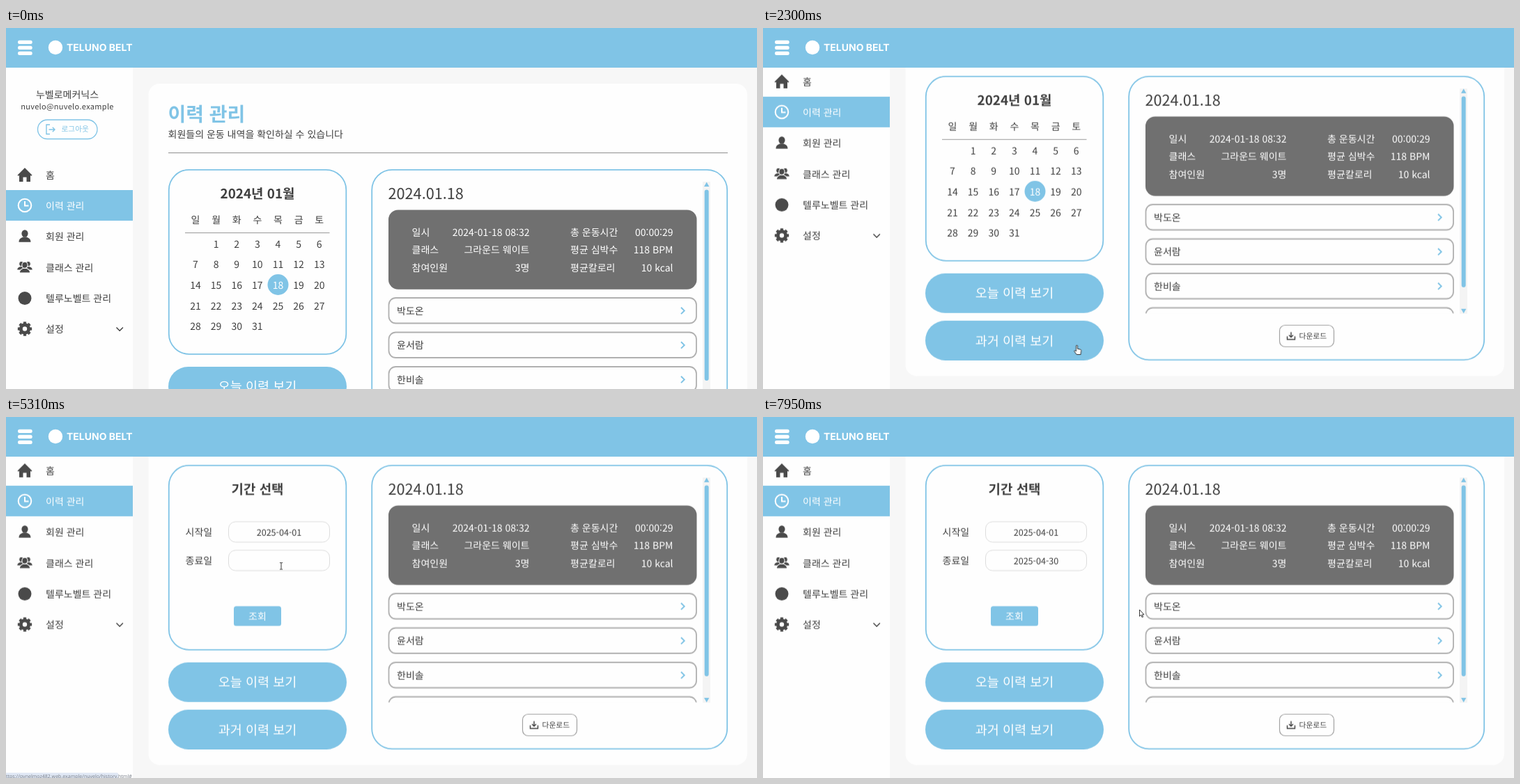
Recreate the animation shown at these times as an HTML page. Size 1078x519 px, loop 8000 ms.

```html
<!DOCTYPE html>
<html lang="ko">
<head>
<meta charset="utf-8">
<title>이력 관리</title>
<style>
  html, body { margin: 0; width: 100%; height: 100%; overflow: hidden; background: #f7f7f7; }
  svg { display: block; width: 100vw; height: 100vh; }
  svg {
    --blue: #80c4e6; --ink: #3f3f3f;
    font: 14px "Noto Sans CJK KR", "Noto Sans KR", "Noto Sans CJK", sans-serif;
    fill: var(--ink); text-rendering: geometricPrecision;
  }
  .blue { fill: var(--blue); }
  .white { fill: #fff; }
  .card { fill: #fefefe; stroke: var(--blue); stroke-width: 1.8; }
  .row { fill: #fefefe; stroke: #b0b0b0; stroke-width: 1.8; }
  .input { fill: #fefefe; stroke: #dcdcdc; }
  .line { fill: none; stroke: var(--ink); stroke-width: 1.4; }
  .mid { text-anchor: middle; }
  .end { text-anchor: end; }
  .medium { font-weight: 500; }
  .heading { font-size: 18.9px; font-weight: 700; }
  .button { font-size: 18.5px; font-weight: 500; fill: #fff; text-anchor: middle; }
  .value { font-size: 12.6px; text-anchor: middle; }
  .picker { font-family: "Liberation Sans", Arial, sans-serif; font-size: 8.3px; }
  .small-bold { font-size: 7px; font-weight: 700; fill: #222; text-anchor: middle; }
  .status { font: 7px "Noto Sans", sans-serif; fill: #7c828c; }

  .page, .month, .period, .start, .finish, .picker, .hover, .status, .cursor path {
    animation: 8s step-end infinite;
  }
  .period, .start, .finish, .picker, .hover, .status, .cursor path { opacity: 0; }
  .page { animation-name: scroll; }
  .month { animation-name: leave; }
  .period { animation-name: enter; }
  .start { animation-name: start; }
  .finish { animation-name: finish; }
  .picker { animation-name: picker; }
  .hover { animation-name: hover; }
  .status { animation-name: status; }
  .cursor { animation: move 8s linear infinite; }
  .cursor path { fill: #fff; stroke: #222; stroke-width: .9; stroke-linejoin: round; }
  .cursor .arrow { animation-name: arrow; }
  .cursor .hand { animation-name: hand; }
  .cursor .beam { animation-name: beam; fill: none; }

  @keyframes scroll {
    0% { transform: none; }
    11.125% { transform: translateY(-62px); }
    12% { transform: translateY(-114px); }
    17%, 100% { transform: translateY(-134.3px); }
  }
  @keyframes leave { 32.125%, 100% { opacity: 0; } }
  @keyframes enter { 32.125%, 100% { opacity: 1; } }
  @keyframes start { 58.75%, 100% { opacity: 1; } }
  @keyframes finish { 83.75%, 100% { opacity: 1; } }
  @keyframes picker {
    46.75% { opacity: 1; transform: none; }
    58.75% { opacity: 0; }
    69% { opacity: 1; transform: translateY(40.8px); }
    83.75%, 100% { opacity: 0; }
  }
  @keyframes hover {
    52.5% { opacity: 1; transform: translate(362.7px, 215.3px); }
    58.75% { opacity: 0; }
    75.4% { opacity: 1; transform: translate(383px, 215.3px); }
    76.5% { transform: translate(383px, 235.2px); }
    77.6% { transform: translate(383px, 255.1px); }
    79% { transform: translate(383px, 275px); }
    81.4% { transform: translate(383px, 294.9px); }
    83.75%, 100% { opacity: 0; }
  }
  @keyframes status {
    58.75% { opacity: 1; }
    67.2% { opacity: 0; }
    84.6% { opacity: 1; }
    94.25% { opacity: .5; }
    95.1%, 100% { opacity: 0; }
  }
  @keyframes move {
    0%, 2.5% { transform: translate(748px, 470px); }
    4.25%, 6.6% { transform: translate(421px, 348px); }
    8.6%, 23.5% { transform: translate(491px, 365.5px); }
    28.75%, 37% { transform: translate(450.5px, 456px); }
    40.5% { transform: translate(436px, 290px); }
    44%, 48.5% { transform: translate(392px, 161px); }
    56%, 63.75% { transform: translate(375px, 219px); }
    66.3%, 68.1% { transform: translate(395px, 209px); }
    70.75%, 72.4% { transform: translate(394px, 203px); }
    78.5% { transform: translate(397.5px, 312px); }
    82.9%, 83.75% { transform: translate(396px, 348px); }
    90%, 96.75% { transform: translate(415px, 231px); }
    99.3%, 100% { transform: translate(540px, 277px); }
  }
  @keyframes arrow {
    2.5% { opacity: 1; } 27% { opacity: 0; }
    39.5% { opacity: 1; } 43.4% { opacity: 0; }
    48.9% { opacity: 1; } 51.2% { opacity: 0; }
    73.5% { opacity: 1; } 75.4% { opacity: 0; }
    83.75%, 100% { opacity: 1; }
  }
  @keyframes hand {
    27% { opacity: 1; } 39.5% { opacity: 0; }
    51.2% { opacity: 1; } 59.6% { opacity: 0; }
    75.4% { opacity: 1; } 83.75%, 100% { opacity: 0; }
  }
  @keyframes beam {
    43.4% { opacity: 1; } 48.9% { opacity: 0; }
    59.6% { opacity: 1; } 73.5%, 100% { opacity: 0; }
  }
</style>
</head>
<body>
<svg viewBox="0 0 1078 519">
  <defs>
    <clipPath id="list"><rect x="540" y="380" width="460" height="164.5"/></clipPath>
  </defs>
  <rect width="1078" height="519" fill="#f7f7f7"/>
  <rect width="182" height="519" fill="#fefefe"/>

  <g class="page">
    <!-- Account -->
    <text x="88" y="101.2" class="mid">누벨로메커닉스</text>
    <text x="88" y="117.4" class="mid" font-size="11" letter-spacing=".3">nuvelo@nuvelo.example</text>
    <rect x="45.5" y="132" width="85.5" height="27.5" rx="13.75" fill="#fefefe" stroke="#80c4e6" stroke-width="1.3"/>
    <path class="line" style="stroke:var(--blue)" d="M63 139h-5v13.500h5M61.500 146h8.500m-3.200-3.200 3.200 3.200-3.200 3.200"/>
    <text x="79.500" y="149.200" class="blue" font-size="10.700">로그아웃</text>

    <!-- Menu -->
    <rect y="233" width="182" height="44" class="blue"/>
    <g id="menu"></g>
    <g fill="#4a4a4a">
      <path d="M16.500 211.500 27 201l10.500 10.500-1.200 1.200-1.300-1V221h-5.500v-6.500h-5V221H19v-9.300l-1.300 1z"/>
      <g fill="none" stroke="#fff" stroke-width="2"><circle cx="27" cy="255" r="9.300"/><path d="M27 249v6.500h5.500"/></g>
      <g id="people"></g>
      <circle cx="27" cy="388.500" r="9.500"/>
      <g fill="none" stroke="#4a4a4a">
        <circle cx="27" cy="432.500" r="5.700" stroke-width="5"/>
        <circle cx="27" cy="432.500" r="8.700" stroke-width="3" pathLength="16" stroke-dasharray="1.200 .8" stroke-dashoffset=".6"/>
      </g>
      <path class="line" stroke-width="1.800" d="M158.500 430.500l4.700 4.700 4.700-4.700"/>
    </g>

    <!-- Main panel -->
    <rect x="204.500" y="80" width="859.500" height="554.500" rx="16" fill="#fefefe"/>
    <text x="232.500" y="134.200" class="blue" font-size="28" font-weight="700">이력 관리</text>
    <text x="232.500" y="158.200">회원들의 운동 내역을 확인하실 수 있습니다</text>
    <path d="M233 179.500H1036" stroke="#8f8f8f"/>
    <rect class="card" x="233.800" y="203.800" width="254.500" height="265" rx="29"/>
    <rect class="card" x="525.200" y="203.800" width="510" height="407.500" rx="29"/>

    <g class="month">
      <text x="361" y="245.400" class="heading mid">2024년 01월</text>
      <path d="M257 294.500H464.500" stroke="#9a9a9a"/>
      <circle cx="390.500" cy="369" r="15" class="blue"/>
      <g id="days" class="mid"></g>
    </g>

    <g class="period">
      <text x="361" y="245.400" class="heading mid">기간 선택</text>
      <text x="257.500" y="305.200" class="medium">시작일</text>
      <text x="257.500" y="346.300" class="medium">종료일</text>
      <rect class="input" x="319.500" y="284.800" width="145" height="29.300" rx="10"/>
      <rect class="input" x="319.500" y="325.800" width="145" height="29.300" rx="10"/>
      <text x="392" y="304.500" class="value start">2025-04-01</text>
      <text x="392" y="345.500" class="value finish">2025-04-30</text>
      <rect x="327" y="406.300" width="68" height="28.500" rx="3.500" class="blue"/>
      <text x="361" y="426" class="white mid medium">조회</text>
    </g>

    <rect x="233" y="487" width="256" height="57" rx="28.500" class="blue"/>
    <rect x="233" y="555" width="256" height="57" rx="28.500" class="blue"/>
    <text x="361" y="522.400" class="button">오늘 이력 보기</text>
    <text x="361" y="590.800" class="button">과거 이력 보기</text>

    <!-- Session details -->
    <text x="548.500" y="245.500" font-size="21.700">2024.01.18</text>
    <rect x="549" y="261.500" width="442.500" height="114.300" rx="14" fill="#707070"/>
    <g id="details" class="white"></g>
    <g id="members" clip-path="url(#list)"></g>
    <rect x="1000" y="221" width="11" height="324" fill="#f4f4f4"/>
    <g class="blue">
      <rect x="1002.700" y="232.500" width="6" height="274.500" rx="3"/>
      <path d="M1002 228l3.700-6.500 3.700 6.500zM1002 538h7.400l-3.700 6.500z"/>
    </g>
    <rect x="741.500" y="561.500" width="78" height="31" rx="8" fill="#fefefe" stroke="#a2a2a2" stroke-width="1.200"/>
    <path class="line" d="M752.500 577.500v4.500h11v-4.500M758 571.500v7m-3-2.800 3 3 3-3"/>
    <text x="769.500" y="581" font-size="10.800">다운로드</text>
  </g>

  <!-- Header -->
  <rect width="1078" height="57" class="blue"/>
  <g class="white">
    <rect x="17" y="17.700" width="20.700" height="5.300" rx="2.500"/>
    <rect x="17" y="25.700" width="20.700" height="5.300" rx="2.500"/>
    <rect x="17" y="33.700" width="20.700" height="5.300" rx="2.500"/>
    <circle cx="71" cy="28" r="10.200"/>
    <text x="87" y="33" font-family="Inter, sans-serif" font-size="14" font-weight="700">TELUNO BELT</text>
  </g>

  <!-- Date picker -->
  <g class="picker">
    <rect x="319.500" y="180.500" width="146" height="136.500" rx="1.500" fill="#fff" stroke="#c4c4c4"/>
    <rect x="321.500" y="182.500" width="142.500" height="15" rx="1.500" fill="#dcdcdc" stroke="#c4c4c4"/>
    <circle cx="328.700" cy="189.600" r="3.900" fill="#333"/>
    <circle cx="455.800" cy="189.600" r="3.900" fill="#333"/>
    <path d="M329.500 187.800l-1.800 1.800 1.800 1.800M455 187.800l1.800 1.800-1.800 1.800" fill="none" stroke="#fff"/>
    <text x="392" y="192.300" class="small-bold">April 2025</text>
    <g id="dates"></g>
    <rect class="hover" width="19" height="18.600" fill="#000" fill-opacity=".07" stroke="#999"/>
  </g>

  <g class="status">
    <rect x="-1" y="511.500" width="162" height="9" rx="1.500" fill="#dfe7f4"/>
    <text x="0" y="519.300">ttps://qvnelmoz482.web.example/nuvelo/history.html#</text>
  </g>

  <g class="cursor">
    <path class="arrow" d="M.5 0V9.500L2.700 7.600 4.200 11 5.600 10.400 4.200 7.100H7z"/>
    <path class="hand" d="M-1 1C-1-.3 1-.3 1 1V5.200L5 6.100C6 6.400 6.300 7 6.200 8L5.500 13.500H-.3L-3.500 9C-4 8-2.900 7.200-2 7.900L-1 8.800z"/>
    <path class="beam" d="M-2 .5H-.6L0 1 .6.500H2M0 1V9.500M-2 10H-.6L0 9.500.6 10H2"/>
  </g>
</svg>
<script>
  const fill = (id, parts) => { document.getElementById(id).innerHTML = parts.join(''); };
  const text = (x, y, label, cls = '') => `<text x="${x}" y="${y}" class="${cls}">${label}</text>`;
  const range = (n) => [...Array(n).keys()];

  fill('menu', ['홈', '이력 관리', '회원 관리', '클래스 관리', '텔루노벨트 관리', '설정']
    .map((label, i) => text(57, 216.5 + i * 44.35, label, i === 1 ? 'white' : '')));

  const person = (x, y, scale) => `<g transform="translate(${x} ${y}) scale(${scale})" stroke="#fefefe" stroke-width="${scale < 1 ? 1.2 : 0}">
    <ellipse cy="-4" rx="4.600" ry="5.200"/><path d="M-8.500 8.300C-8.500 3 -5 2.500 -2.500 1H2.500C5 2.500 8.500 3 8.500 8.300z"/></g>`;
  fill('people', [person(27, 299.5, 1), person(22, 342, .72), person(32, 342, .72), person(27, 344.5, .9)]);

  const column = (i) => 272 + i * 29.62;
  fill('days', [
    ...[...'일월화수목금토'].map((name, i) => text(column(i), 280.7, name)),
    ...range(31).map((i) => text(column((i + 1) % 7), 315.8 + Math.floor((i + 1) / 7) * 29.6, i + 1, i === 17 ? 'white' : '')),
  ]);

  const details = [
    ['일시', '2024-01-18 08:32', '총 운동시간', '00:00:29'],
    ['클래스', '그라운드 웨이트', '평균 심박수', '118 BPM'],
    ['참여인원', '3명', '평균칼로리', '10 kcal'],
  ];
  fill('details', details.flatMap((row, r) => row.map((label, c) =>
    text([582.5, 751.5, 810, 957.5][c], 298.8 + r * 25.6, label, c % 2 ? 'end medium' : ''))));

  fill('members', ['박도온', '윤서람', '한비솔', ''].map((name, i) => `<g transform="translate(0 ${i * 49.5})">
    <rect class="row" x="549.500" y="388" width="441.500" height="36.500" rx="10"/>
    ${text(561, 411.7, name)}
    <path class="line" style="stroke:var(--blue);stroke-width:2" d="M969 401.700l4.700 4.700-4.700 4.700"/></g>`));

  const dateCell = (day) => {
    const slot = day + 1;
    const x = 322 + slot % 7 * 20.35;
    const y = 215.3 + Math.floor(slot / 7) * 19.9;
    const [back, edge, ink] = day === 23 ? ['#fdf784', '#f6ea8c', '#777'] : ['#f2f2f2', '#d0d0d0', '#555'];
    return `<rect x="${x}" y="${y}" width="19" height="18.600" fill="${back}" stroke="${edge}"/>
      <g fill="${ink}">${text(x + 17, y + 10, day, 'end')}</g>`;
  };
  fill('dates', [
    ...['Su', 'Mo', 'Tu', 'We', 'Th', 'Fr', 'Sa'].map((name, i) => text(331.2 + i * 20.3, 208.6, name, 'small-bold')),
    ...range(30).map((i) => dateCell(i + 1)),
  ]);
</script>
</body>
</html>
```
